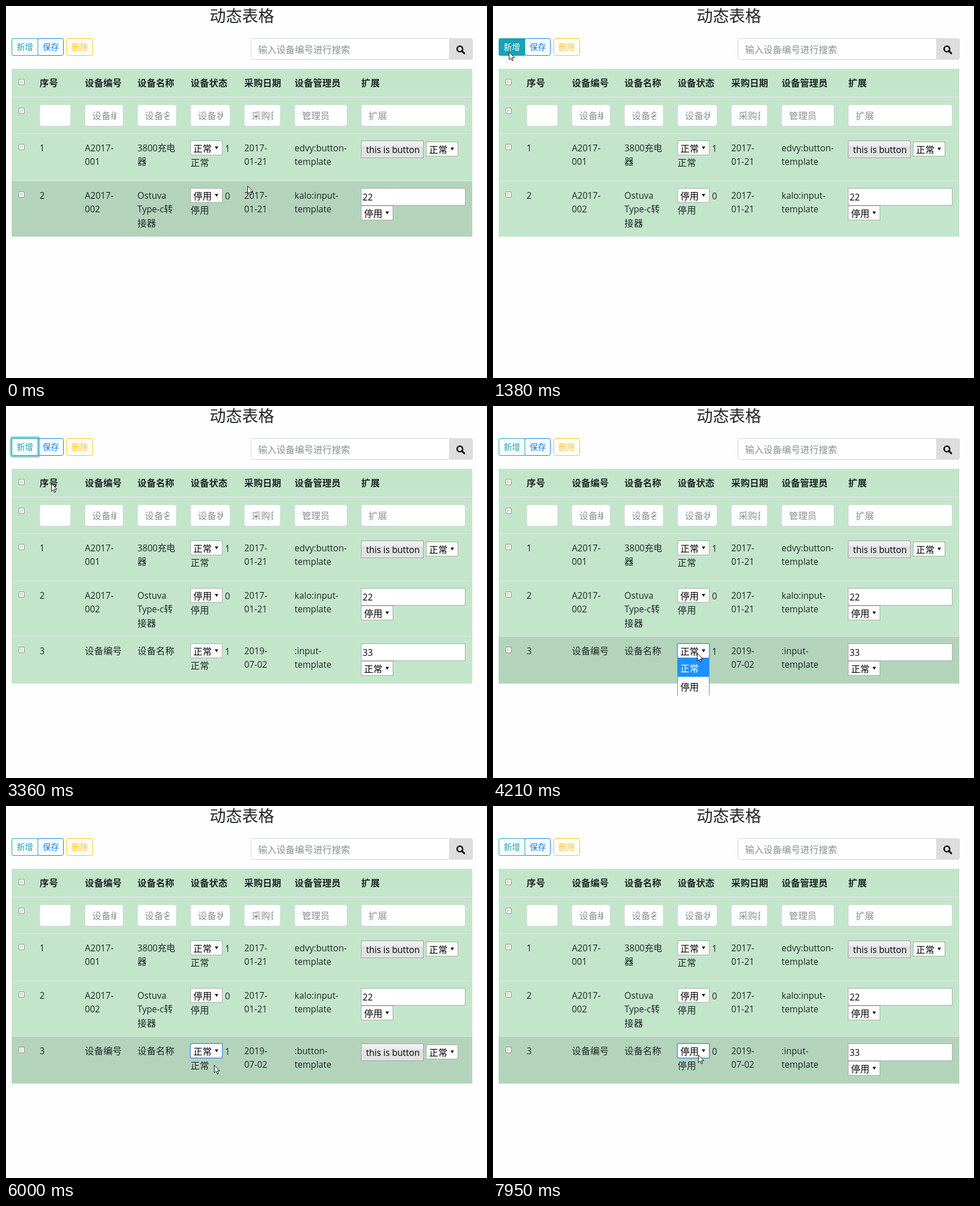
Animation of 851 by 658 pixels, one loop 8000 ms. Source, as an HTML page:

```html
<!DOCTYPE html>
<html lang="zh-CN">
<head>
<meta charset="utf-8">
<title>动态表格</title>
<style>
html, body { margin: 0; width: 100%; height: 100%; overflow: hidden; background: #fefefe; }
svg { display: block; font-family: "Open Sans", "Noto Sans CJK SC", "Noto Sans CJK", sans-serif; }
</style>
</head>
<body>
<svg width="851" height="658" viewBox="0 0 851 658">
  <defs>
    <linearGradient id="btn" x2="0" y2="1">
      <stop offset="0" stop-color="#f3f3f3"/><stop offset=".32" stop-color="#ececec"/>
      <stop offset=".34" stop-color="#e0e0e0"/><stop offset="1" stop-color="#e4e4e4"/>
    </linearGradient>
    <linearGradient id="box" x2="1" y2="1">
      <stop offset="0" stop-color="#d2d6d3"/><stop offset="1" stop-color="#f6f6f6"/>
    </linearGradient>
  </defs>
  <g id="scene"></g>
  <path id="cursor" d="M.5 .5V14l3.1-2.9 2.1 4.9 2.1-.9-2.1-4.7h4.4z" fill="#fff" stroke="#111"/>
</svg>
<script>
const LOOP = 8000, TICK = 139.5, LEAD = 18;
const INK = '#212529', GREY = '#868e96', LINE = '#dee2e6';
const TEAL = '#17a2b8', BLUE = '#007bff', GOLD = '#ffc107', FOCUS = '#4d90e0';
const LEFT = 10, WIDE = 815, HEAD_TOP = 111, BODY_TOP = 162;

const columns = [
  { x: 59, w: 56, head: '序号', hint: '' },
  { x: 139, w: 69, head: '设备编号' },
  { x: 232, w: 70, head: '设备名称' },
  { x: 326, w: 71, head: '设备状态' },
  { x: 421, w: 65, head: '采购日期' },
  { x: 510, w: 94, head: '设备管理员', hint: '管理员' },
  { x: 628, w: 185, head: '扩展' }
];

const devices = [
  { h: 84, code: 'A2017-/001', name: '3800充电/器', date: '2017-/01-21', keeper: 'edvy', on: true, button: true },
  { h: 98, code: 'A2017-/002', name: 'Ostuva/Type-c转/接器', date: '2017-/01-21', keeper: 'kalo', value: '22' },
  { h: 83, code: '设备编号', name: '设备名称', date: '2019-/07-02', keeper: '', value: '33' }
];

// pointer moves, timed in ticks
const moves = [
  { from: 2, to: 5, x: 201, y: 214 },
  { from: 5, to: 10, x: 28, y: 81 },
  { from: 22, to: 30, x: 361, y: 437 },
  { from: 30, to: 34, x: 361, y: 484 },
  { from: 35, to: 38, x: 363, y: 437 },
  { from: 38, to: 41, x: 368, y: 462 },
  { from: 42, to: 43, x: 368, y: 458 },
  { from: 45, to: 47, x: 364, y: 438 },
  { from: 48, to: 51, x: 365, y: 492 },
  { from: 52, to: 57, x: 363, y: 440 }
];

const rect = (x, y, w, h, fill, stroke = 'none', r = 0) =>
  `<rect x="${x}" y="${y}" width="${w}" height="${h}" rx="${r}" fill="${fill}" stroke="${stroke}"/>`;
const frame = (x, y, w, h, fill, stroke, r) => rect(x + .5, y + .5, w - 1, h - 1, fill, stroke, r);
const band = (y, h, fill) => rect(LEFT, y, WIDE, h, fill);
const text = (x, y, s, fill = INK, size = /^[\x00-\x7f]/.test(s) ? 15.6 : 16.3, more = '') =>
  `<text x="${x}" y="${y}" fill="${fill}" font-size="${size}" ${more}>${s}</text>`;
const lines = (x, y, s) => s.split('/').map((line, i) => text(x, y + 24.4 * i, line)).join('');
const label = on => on ? '正常' : '停用';
const ease = k => k * k * (3 - 2 * k);

function pointer(n) {
  let x = 427, y = 318;
  for (const m of moves) {
    const k = ease(Math.min(1, Math.max(0, (n - m.from) / (m.to - m.from))));
    x += (m.x - x) * k;
    y += (m.y - y) * k;
  }
  return [Math.round(x), Math.round(y)];
}

function select(x, y, on, focus) {
  return (focus ? rect(x, y, 57, 26, '#fff', FOCUS, 1) : '') +
    frame(x, y, 57, 26, '#fff', focus ? FOCUS : '#a9a9a9') +
    text(x + 5.5, y + 19.5, label(on), '#000') +
    `<path d="M${x + 43.5} ${y + 10.5}h6l-3 5z" fill="#000"/>`;
}

const checkbox = y =>
  frame(22, y, 11, 11, '#f4f4f4', '#929a94', 1.5) + rect(24.5, y + 2.5, 6, 6, 'url(#box)');

function row(d, index, top) {
  const y = top + 12, base = y + 19;
  const [no, code, name, state, date, keeper, extra] = columns.map(c => c.x + .6);
  const box = Math.floor(extra);
  const s = checkbox(y + 6) + text(no, base, index + 1) + lines(code, base, d.code) +
    lines(name, base, d.name) + select(326, y, d.on, d.focus) +
    text(387.5, base + .5, d.on ? '1' : '0') + text(state, y + 45, label(d.on)) +
    lines(date, base, d.date) + lines(keeper, base, `${d.keeper}:${d.button ? 'button' : 'input'}-/template`);
  return s + (d.button
    ? frame(box, y, 111, 31, 'url(#btn)', '#a0a0a0') +
      text(box + 9, y + 22, 'this is button', '#000') + select(box + 115, y + 2, d.on)
    : frame(box, y, 185, 31, '#fff', '#a9a9a9') +
      text(box + 3, y + 21.5, d.value, '#000') + select(box, y + 31, d.on));
}

function toolbar(filled, ring) {
  const add = 'M13 57.5H56.5V87.5H13Q10.5 87.5 10.5 85V60Q10.5 57.5 13 57.5z';
  return text(417.5, 28, '动态表格', INK, 28.6, 'text-anchor="middle"') +
    frame(56, 57, 46, 31, '#fefefe', BLUE, 3) + text(65, 78, '保存', BLUE, 14.4) +
    frame(107, 57, 47, 31, '#fefefe', GOLD, 3) + text(116, 78, '删除', GOLD, 14.4) +
    (ring ? `<path d="${add}" fill="none" stroke="${TEAL}" stroke-opacity=".5" stroke-width="7.4" stroke-linejoin="round"/>` : '') +
    `<path d="${add}" fill="${filled ? TEAL : '#fefefe'}" stroke="${TEAL}"/>` +
    text(19, 78, '新增', filled ? '#fff' : TEAL, 14.4) +
    frame(433, 57, 361, 38, '#fff', '#ced4da', 4) + text(446, 83, '输入设备编号进行搜索', GREY) +
    `<path d="M784 57H822Q826 57 826 61V91Q826 95 822 95H784z" fill="#ddd"/>
     <circle cx="803" cy="76" r="4.9" fill="none" stroke="#000" stroke-width="2.5"/>
     <path d="M806.8 79.8L810.8 83.8" stroke="#000" stroke-width="3" stroke-linecap="round"/>`;
}

function header() {
  return checkbox(129) + band(160, 2, LINE) +
    columns.map(c => text(c.x + .6, 142, c.head, INK, 16.3, 'font-weight="700"')).join('');
}

function filters() {
  return checkbox(180) + columns.map(({ x, w, head, hint = head }) =>
    frame(x, 174, w, 39, '#fff', '#ced4da', 4) +
    `<svg x="${x + 13}" y="174" width="${w - 26}" height="39">${text(.6, 26, hint, GREY)}</svg>`
  ).join('');
}

function dropdown(pick) {
  const item = (y, on) => (pick === on ? rect(326, y, 57, 33, '#1e90ff') : '') +
    text(331.5, y + 24, label(on), pick === on ? '#fff' : '#000');
  return rect(326, 446, 57, 66, '#fff') + item(446, true) + item(479, false) +
    `<path d="M326.5 446V512M382.5 446V512" stroke="${FOCUS}"/>`;
}

function scene(n, x, y) {
  const during = (a, b) => n >= a && n < b;
  const open = during(30, 35) || during(38, 42) || during(48, 52);
  const [first, second, third] = devices;
  const live = { ...third, on: !during(35, 42) && n < 52, button: during(42, 52), focus: n >= 30 };
  const shown = n < 19 ? [first, second] : [first, second, live];

  let top = BODY_TOP, body = '';
  const addRow = (h, content, held) => {
    const hover = held || (!open && y >= top && y < top + h);
    body += band(top, h, hover ? '#b3d4bb' : '#c3e6cb') + content;
    top += h;
  };
  addRow(64, filters());
  shown.forEach((d, i) =>
    addRow(d.h, band(top - 1, 1, LINE) + row(d, i, top), open && d === live));

  return toolbar(x < 57 && y > 57 && y < 88, during(18, 30)) +
    band(HEAD_TOP, BODY_TOP - HEAD_TOP, '#c3e6cb') + header() + body +
    (open ? dropdown(n === 30 || y < 479) : '');
}

const stage = document.getElementById('scene');
const cursor = document.getElementById('cursor');
const start = performance.now();
let last = -1;

function draw() {
  const n = Math.floor(((performance.now() - start) % LOOP + LEAD) / TICK);
  if (n !== last) {
    last = n;
    const [x, y] = pointer(n);
    stage.innerHTML = scene(n, x, y);
    cursor.setAttribute('transform', `translate(${x} ${y})`);
  }
  requestAnimationFrame(draw);
}
draw();
</script>
</body>
</html>
```
